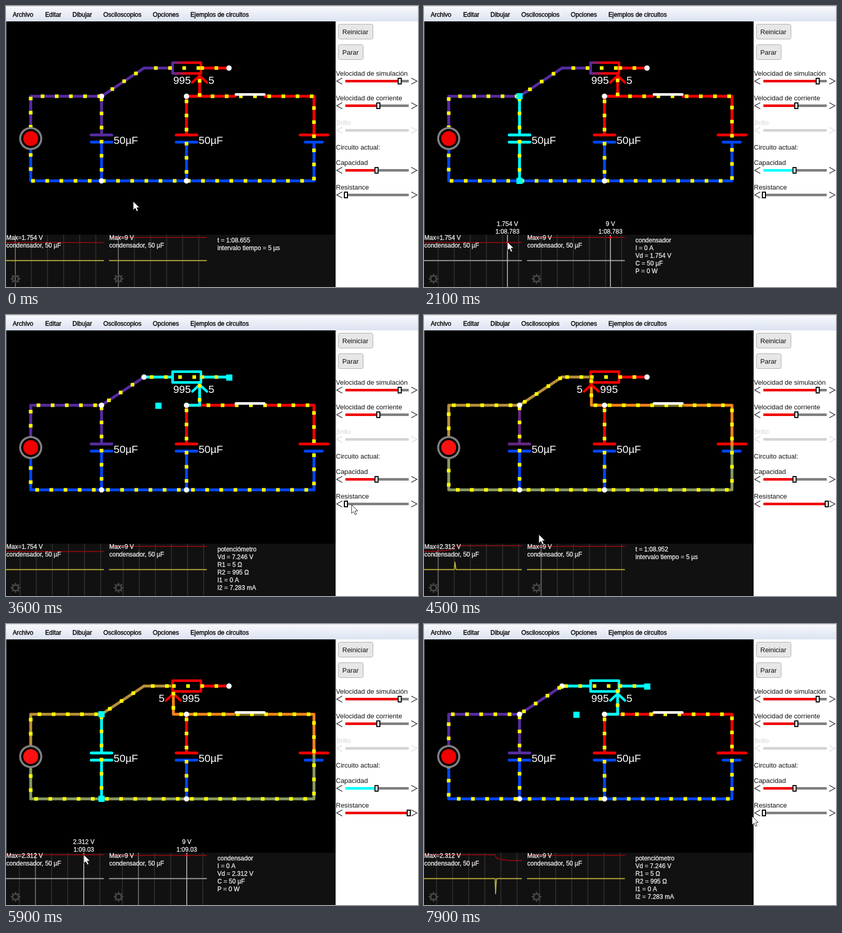
An HTML page with a canvas for the animation above (8000 ms loop, 800x548 px).

```html
<!DOCTYPE html>
<html lang="es">
<head>
<meta charset="utf-8">
<title>Simulador de circuitos</title>
<style>
html, body { margin: 0; width: 100%; height: 100%; overflow: hidden; background: #fff; }
canvas { display: block; }
</style>
</head>
<body>
<canvas id="stage" width="800" height="548"></canvas>
<script>
const ctx = document.getElementById('stage').getContext('2d');
const LOOP = 8000, STEP = 100, GAP = 27.5, MS_PER_PX = 0.32;
const L = 48, C1 = 185.5, C2 = 350.5, R = 598, TOP = 176, BOT = 341, POT = 121;
const CYAN = '#00ffff', RED = '#f00000', WHITE = '#fff', YELLOW = '#ffff00';

// Keyframes: [time, value, ...]
const CLOCK = [[0, 655], [800, 705], [2100, 792], [4500, 952], [5900, 1042.5], [7900, 1173]];
const FLOW = [[0, 0], [800, 30.5], [2100, 83.5], [3600, 145.5], [4500, 178], [5900, 253.5], [7900, 345]];
const MOUSE = [[0, 247, 381], [400, 247, 385], [800, 226, 446], [1100, 190, 461], [2100, 162, 460],
  [2700, 164, 460], [3300, 662, 372], [3600, 671, 370], [3878, 783, 370], [4500, 223, 428],
  [4900, 160, 451], [5900, 151, 450], [6900, 152, 451], [7500, 780, 370], [7650, 783, 370],
  [7793, 655, 372], [7900, 637, 375]];

const clamp = v => Math.max(0, Math.min(1, v));
function at(keys, t, i = 1) {
  let n = 1;
  while (n < keys.length - 1 && keys[n][0] < t) n++;
  const a = keys[n - 1], b = keys[n];
  return a[i] + (b[i] - a[i]) * clamp((t - a[0]) / (b[0] - a[0]));
}
const mix = (a, b, m) => `rgb(${a.map((v, i) => Math.round(v + (b[i] - v) * m))})`;

// Slider position and LED voltage as functions of simulated time
const wiper = s => clamp((s - 894) / 16.5) - clamp((s - 1156.5) / 9.5);
const voltage = s => 1.7536 + 0.1055 * Math.log(995 / (995 - 990 * wiper(s)));
const num = v => String(+v.toFixed(3));
function clock(ms) {
  const [whole, frac] = num(8 + ms / 1000).split('.');
  return '1:' + whole.padStart(2, '0') + (frac ? '.' + frac : '');
}

function line(color, width, ...pts) {
  ctx.strokeStyle = color;
  ctx.lineWidth = width;
  ctx.beginPath();
  for (let i = 0; i < pts.length; i += 2) ctx.lineTo(pts[i], pts[i + 1]);
  ctx.stroke();
}
function box(color, x, y, w, h) {
  ctx.fillStyle = color;
  ctx.fillRect(x, y, w, h);
}
function disc(color, x, y, r) {
  ctx.fillStyle = color;
  ctx.beginPath();
  ctx.arc(x, y, r, 0, 7);
  ctx.fill();
}
function text(str, x, y, size, color, align = 'left', weight = 0) {
  ctx.font = size + 'px "Liberation Sans", Arial, sans-serif';
  ctx.textAlign = align;
  ctx.fillStyle = color;
  ctx.fillText(str, x, y);
  if (weight) {
    ctx.strokeStyle = color;
    ctx.lineWidth = weight;
    ctx.strokeText(str, x, y);
  }
}
const note = (str, x, y, align) => text(str, x, y, 12, '#f4f4f4', align, 0.3);
const dot = (x, y) => box(YELLOW, x - 3.5, y - 3.5, 7, 7);

// Evenly spaced dots along a polyline
function dots(phase, pts) {
  let d = phase % GAP;
  for (let i = 1; i < pts.length; i++) {
    const [x, y] = pts[i - 1], dx = pts[i][0] - x, dy = pts[i][1] - y;
    const len = Math.hypot(dx, dy);
    for (; d < len; d += GAP) dot(x + dx * d / len, y + dy * d / len);
    d -= len;
  }
}

function drawMenu() {
  const g = ctx.createLinearGradient(0, 0, 0, 30);
  g.addColorStop(0, '#f8f9fc');
  g.addColorStop(0.35, '#eef1f8');
  g.addColorStop(1, '#dce3f1');
  box(g, 0, 0, 800, 30);
  box('#d4d4d4', 0, 0, 800, 1);
  [['Archivo', 13], ['Editar', 76], ['Dibujar', 129], ['Osciloscopios', 189], ['Opciones', 285],
    ['Ejemplos de circuitos', 358]].forEach(([s, x]) => text(s, x, 21, 12, '#000', 'left', 0.4));
}

function button(label, y, w) {
  ctx.beginPath();
  ctx.roundRect(645.5, y + 0.5, w, 29, 3);
  ctx.fillStyle = '#e7e7e7';
  ctx.fill();
  ctx.strokeStyle = '#ababab';
  ctx.lineWidth = 1;
  ctx.stroke();
  text(label, 653, y + 20, 13, '#111');
}

function slider(label, y, knob, color = RED) {
  const off = knob === null, ink = off ? '#d3d3d3' : '#111';
  text(label, 640.5, y - 10.5, 13, ink);
  line(ink, 1.2, 653, y - 6, 642, y, 653, y + 6);
  line(ink, 1.2, 787, y - 6, 798, y, 787, y + 6);
  box(off ? '#d3d3d3' : '#808080', 659, y - 2.5, 123, 5);
  if (off) return;
  box(color, 659, y - 2.5, knob - 659, 5);
  box('#000', knob - 4, y - 6.5, 8, 13);
  box(WHITE, knob - 2, y - 4.5, 4, 9);
}

function drawPanel(k, overCap, overPot) {
  box(WHITE, 640, 30, 160, 518);
  button('Reiniciar', 35, 67);
  button('Parar', 75, 48);
  slider('Velocidad de simulación', 146.5, 764.5);
  slider('Velocidad de corriente', 194.5, 723);
  slider('Brillo', 242.5, null);
  text('Circuito actual:', 640.5, 280, 13, '#111');
  slider('Capacidad', 320.5, 719.5, overCap ? CYAN : RED);
  slider('Resistance', 368.5, 660 + 122 * k, overPot ? CYAN : RED);
}

function capacitor(x, top, bottom) {
  line(top, 5.5, x, TOP, x, 251);
  line(bottom, 5.5, x, 265.5, x, BOT);
  line(top, 5.5, x - 20, 251.5, x + 20, 251.5);
  line(bottom, 5.5, x - 20, 265.5, x + 20, 265.5);
  text('50µF', x + 23.5, 269, 20.6, WHITE);
}

function drawCircuit(t, k, overCap, overPot) {
  const m = k ** 8, wx = 376 - 51 * k, phase = at(FLOW, t);
  const purple = [86, 44, 160], red = [240, 0, 0], blue = [0, 70, 250];
  const left = mix(purple, [184, 144, 56], m);
  const hot = mix(red, [242, 132, 24], m);
  const ground = mix(blue, [136, 154, 98], m);
  const cold = mix(blue, blue, 0);
  const lead = overPot ? CYAN : left, tap = overPot ? CYAN : hot;

  box('#000', 0, 30, 640, 416);
  box('#777', 0, 30, 1, 416);
  line(left, 5.5, 268, POT, C1, TOP, L, TOP, L, 238);
  line(ground, 5.5, L, 279, L, BOT, R, BOT, R, 265.5);
  line(hot, 5.5, R, 251, R, TOP, 503, TOP);
  line(hot, 5.5, 445, TOP, C2, TOP);
  if (m > 0.1) line('#7d7424', 4, 445, 177, 503, 177);
  line(RED, 5.5, 571, 251.5, 625, 251.5);
  line(cold, 5.5, 581, 265.5, 614, 265.5);
  if (m > 0.5) {
    line(hot, 5.5, R, 246, R, 257);
    line(ground, 5.5, R, 258, R, 270);
  }

  if (overCap) capacitor(C1, CYAN, CYAN);
  else capacitor(C1, mix(purple, [100, 40, 128], m), cold);
  capacitor(C2, RED, cold);

  // Potentiometer
  const body = ctx.createLinearGradient(323, 0, 379, 0);
  body.addColorStop(0, mix(purple, red, m));
  body.addColorStop(0.5, RED);
  const rim = overPot ? CYAN : body, metal = overPot ? CYAN : RED;
  line(lead, 5.5, 268, POT, 323, POT);
  line(metal, 5.5, 380, POT, 433, POT);
  ctx.strokeStyle = rim;
  ctx.lineWidth = 5;
  ctx.strokeRect(323.5, 110.5, 55, 21);
  line(tap, 5.5, C2, TOP, wx, TOP, wx, 136);
  line(metal, 5, wx - 14, 149, wx, 136, wx + 14, 149);
  text(Math.round(995 - 990 * k), wx - 17, 152, 20.6, WHITE, 'right');
  text(Math.round(5 + 990 * k), wx + 17, 152, 20.6, WHITE);

  dots(4.5 + phase, [[C1, TOP], [L, TOP], [L, BOT], [R, BOT], [R, TOP], [wx, TOP], [wx, POT], [268, POT]]);
  dots(18.9 + phase, [[268, POT], [C1, TOP]]);
  dots(6, [[C1, TOP], [C1, BOT]]);
  dots(10, [[C2, TOP], [C2, BOT]]);
  for (let x = 408.5; x > wx - 2; x -= GAP) dot(x, POT);

  // Switch and LED
  line(WHITE, 5, 446.5, 172.5, 501.5, 172.5);
  disc('#808080', L, 258.5, 22.5);
  disc('#000', L, 258.5, 18.5);
  disc(mix(red, [250, 18, 18], m), L, 258.5, 14.5);

  // Nodes and handles
  const node = (x, y) => disc(WHITE, x, y, 5.2);
  const handle = (x, y) => box(CYAN, x - 6, y - 6, 12, 12);
  node(C2, TOP);
  node(C2, BOT);
  (overCap ? handle : node)(C1, TOP);
  (overCap ? handle : node)(C1, BOT);
  if (overPot) {
    node(268, POT);
    dots(18.9 + phase, [[268, POT], [258, 127.7]]);
    handle(433.5, 122);
    handle(296, 177);
  } else node(433, POT);
}

function gear(x, y) {
  ctx.strokeStyle = ctx.fillStyle = '#444';
  ctx.lineWidth = 3;
  ctx.beginPath();
  ctx.arc(x, y, 5.5, 0, 7);
  ctx.stroke();
  for (let i = 0; i < 8; i++) {
    const c = Math.cos(i * Math.PI / 4), s = Math.sin(i * Math.PI / 4);
    line('#444', 3, x + 6 * c, y + 6 * s, x + 9.5 * c, y + 9.5 * s);
  }
}

function scope(x0, now, level, gain, label, hoverX) {
  const hover = hoverX !== null;
  ctx.save();
  ctx.translate(x0, 0);
  ctx.lineCap = 'butt';
  for (let g = Math.ceil((now - 60) / 10) * 10; g <= now; g += 10) {
    const x = 190 - (now - g) / MS_PER_PX;
    line(g % 100 ? '#2e2e2e' : '#707070', 1.8, x, 446, x, 548);
  }
  gear(18.5, 532);
  const volts = [], amps = [];
  let max = 0;
  for (let x = 0; x <= 190; x++) {
    const s = now - (190 - x) * MS_PER_PX, v = level(s), d = v - level(s - MS_PER_PX);
    max = Math.max(max, v);
    volts.push(x, 496.3 - gain * v);
    amps.push(x, 496.5 - Math.sign(d) * Math.max(Math.abs(d) - 0.05, 0) * 260);
  }
  line(hover ? '#a4a4a4' : '#bdb23c', 1.8, ...amps);
  line('#870b10', 2, ...volts);
  if (hover) {
    const s = now - (190 - hoverX) * MS_PER_PX, v = level(s);
    line('#c0c0c0', 1.6, hoverX, 446, hoverX, 548);
    disc('#e01010', hoverX, 496.3 - gain * v, 2.5);
    note(num(v) + ' V', hoverX, 429, 'center');
    note(clock(s + 60 * 1000 - 60 * 1000), hoverX, 444, 'center');
  }
  note('Max=' + num(max) + ' V', 0.5, 455.5);
  note(label, 0.5, 470.5);
  ctx.restore();
}

function drawScopes(now, hoverX, overPot) {
  const label = 'condensador, 50 µF', v = voltage(now), k = wiper(now);
  box('#111', 0, 446, 640, 102);
  scope(0, now, voltage, 20, label, hoverX);
  scope(200, now, () => 9, 5, label, hoverX);
  let info = ['t = ' + clock(now), 'intervalo tiempo = 5 µs'];
  if (hoverX !== null) {
    info = ['condensador', 'I = 0 A', `Vd = ${num(v)} V`, 'C = 50 µF', 'P = 0 W'];
  } else if (overPot) {
    const r2 = 995 - 990 * k, amp = (9 - v) / r2;
    info = ['potenciómetro', `Vd = ${num(9 - v)} V`, `R1 = ${num(5 + 990 * k)} Ω`, `R2 = ${num(r2)} Ω`,
      'I1 = 0 A', 'I2 = ' + (amp < 1 ? num(amp * 1000) + ' mA' : num(amp) + ' A')];
  }
  info.forEach((s, i) => note(s, 410.5, 460.5 + 15 * i));
}

function drawPointer(x, y) {
  const shape = [0, 0, 0, 17, 4, 13.3, 6.8, 19.5, 9.6, 18.2, 6.9, 12.2, 12, 12];
  ctx.beginPath();
  for (let i = 0; i < shape.length; i += 2) ctx.lineTo(x + shape[i], y + shape[i + 1]);
  ctx.closePath();
  ctx.fillStyle = WHITE;
  ctx.fill();
  ctx.strokeStyle = '#222';
  ctx.lineWidth = 1;
  ctx.stroke();
}

function draw(t) {
  const now = at(CLOCK, t), k = wiper(now);
  const mx = at(MOUSE, t), my = at(MOUSE, t, 2);
  const overCap = my > 447 && mx < 190;
  const overPot = mx > 636 && my > 345 && my < 385;
  ctx.lineCap = ctx.lineJoin = 'round';
  drawCircuit(t, k, overCap, overPot);
  drawScopes(now, overCap ? mx : null, overPot);
  if (my > 440 && my <= 447 && mx < 640) box(CYAN, 0, 441.5, 640, 4.5);
  ctx.lineCap = 'butt';
  ctx.lineJoin = 'miter';
  drawMenu();
  drawPanel(k, overCap, overPot);
  drawPointer(mx, my);
}

function tick() {
  const t = performance.now() % LOOP;
  draw(Math.floor(t / STEP) * STEP);
  requestAnimationFrame(tick);
}
tick();
</script>
</body>
</html>
```
